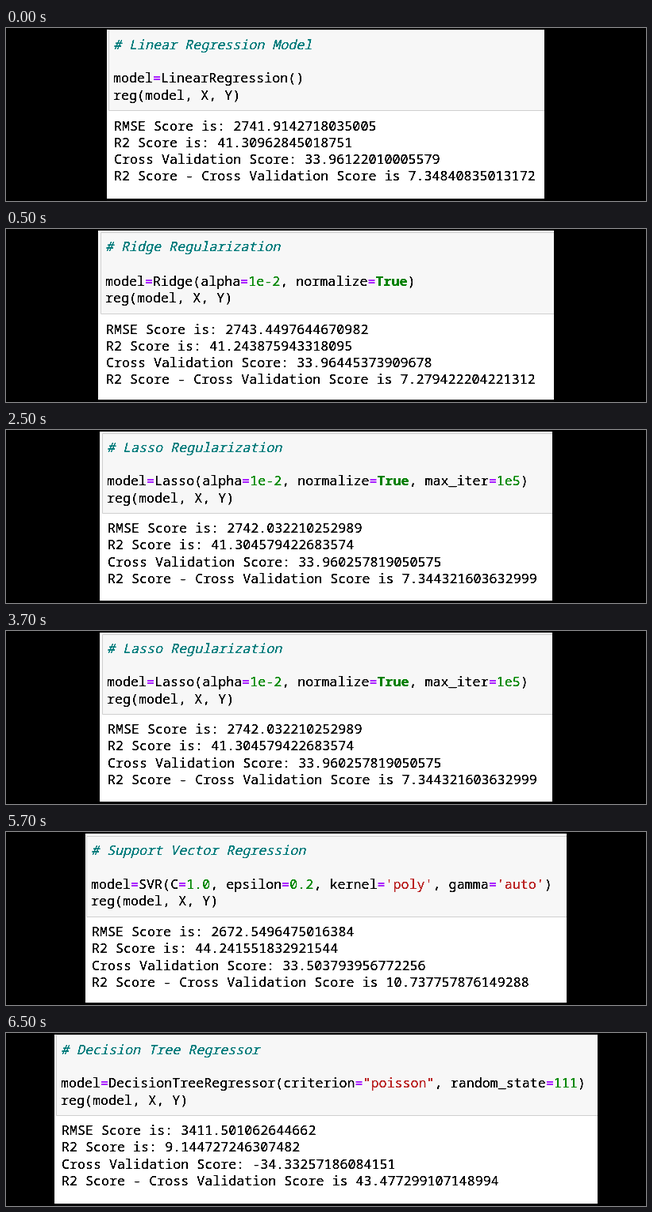
Recreate the animation shown at these times as an HTML page. Size 806 by 219 pixels, loop 8 s.

```html
<!DOCTYPE html>
<html lang="en">
<head>
<meta charset="utf-8">
<title>Regression scores</title>
<style>
html, body { margin: 0; width: 100%; height: 100%; overflow: hidden; background: #000; }
svg { display: block; }
text { font: 16.7px "Noto Sans Mono", "DejaVu Sans Mono", monospace; white-space: pre; fill: #000; }
.comment { fill: #007c7c; font-style: italic; }
.string { fill: #ba2121; }
.number { fill: #080; }
.operator { fill: #a2f; font-weight: bold; }
.keyword { fill: #008000; font-weight: bold; }
</style>
</head>
<body>
<svg width="806" height="219" viewBox="0 0 806 219">
  <!-- hardens the edges of the lettering -->
  <filter id="crisp" filterUnits="userSpaceOnUse" x="0" y="0" width="806" height="219" color-interpolation-filters="sRGB">
    <feComponentTransfer><feFuncA type="linear" slope="3" intercept="-.5"/></feComponentTransfer>
  </filter>
  <g id="stage"></g>
</svg>
<script>
const LOOP = 8000;

// left/right: page edges; cell/top/bottom: code cell edges; y: baselines
const scenes = [
  { start: 0, left: 127, right: 678, cell: 129, top: 2, bottom: 105, y: [27, 69, 91, 129.5],
    title: "Linear Regression Model", call: "LinearRegression()",
    scores: ["2741.9142718035005", "41.30962845018751", "33.96122010005579", "7.34840835013172"] },
  { start: 500, left: 116, right: 690, cell: 119, top: 4, bottom: 108, y: [28, 72, 93, 132.5],
    title: "Ridge Regularization", call: "Ridge(alpha=1e-2, normalize=True)",
    scores: ["2743.4497644670982", "41.243875943318095", "33.96445373909678", "7.279422204221312"] },
  { start: 2500, left: 118, right: 688, cell: 121, top: 4, bottom: 106, y: [28, 70, 92, 130],
    title: "Lasso Regularization", call: "Lasso(alpha=1e-2, normalize=True, max_iter=1e5)",
    scores: ["2742.032210252989", "41.304579422683574", "33.960257819050575", "7.344321603632999"] },
  { start: 4500, left: 100, right: 706, cell: 101, top: 5, bottom: 108, y: [29, 72, 93, 132],
    title: "Support Vector Regression", call: "SVR(C=1.0, epsilon=0.2, kernel='poly', gamma='auto')",
    scores: ["2672.5496475016384", "44.241551832921544", "33.503793956772256", "10.737757876149288"] },
  { start: 6500, left: 61, right: 745, cell: 63, top: 2, bottom: 105, y: [27, 69, 91, 129],
    title: "Decision Tree Regressor", call: 'DecisionTreeRegressor(criterion="poisson", random_state=111)',
    scores: ["3411.501062644662", "9.144727246307482", "-34.33257186084151", "43.477299107148994"] }
];

const labels = ["RMSE Score is: ", "R2 Score is: ", "Cross Validation Score: ",
  "R2 Score - Cross Validation Score is "];
const kinds = ["string", "number", "operator", "keyword"];
const tokens = /(["'].*?["'])|(\b\d[\d.]*(?:e-?\d+)?)|(=)|(\bTrue\b)/g;

const highlight = code => code.replace(tokens, (word, ...groups) =>
  `<tspan class="${kinds[groups.findIndex((g, i) => i < 4 && g)]}">${word}</tspan>`);

const line = (x, y, content, kind = "") =>
  `<text x="${x}" y="${Math.round(y)}" class="${kind}">${content}</text>`;

function draw({ left, right, cell, top, bottom, y, title, call, scores }) {
  const x = cell + 6;
  const lines = [
    line(x, y[0], "# " + title, "comment"),
    line(x, y[1], highlight("model=" + call)),
    line(x, y[2], "reg(model, X, Y)"),
    ...scores.map((score, i) => line(x + 1, y[3] + i * 21.3, labels[i] + score))
  ];
  return `<rect x="${left}" y="2" width="${right - left}" height="214" fill="#fff"/>
    <path d="M${right} ${top + .5}H${cell + .5}V${bottom - .5}H${right}" fill="#f7f7f7" stroke="#cfcfcf"/>
    <g filter="url(#crisp)">${lines.join("")}</g>`;
}

const stage = document.getElementById("stage");
const begin = performance.now();
let shown;

function tick(now) {
  const t = Math.max(0, now - begin) % LOOP;
  const scene = scenes.findLast(s => s.start <= t);
  if (scene !== shown) {
    shown = scene;
    stage.innerHTML = draw(scene);
  }
  requestAnimationFrame(tick);
}
tick(begin);
</script>
</body>
</html>
```
